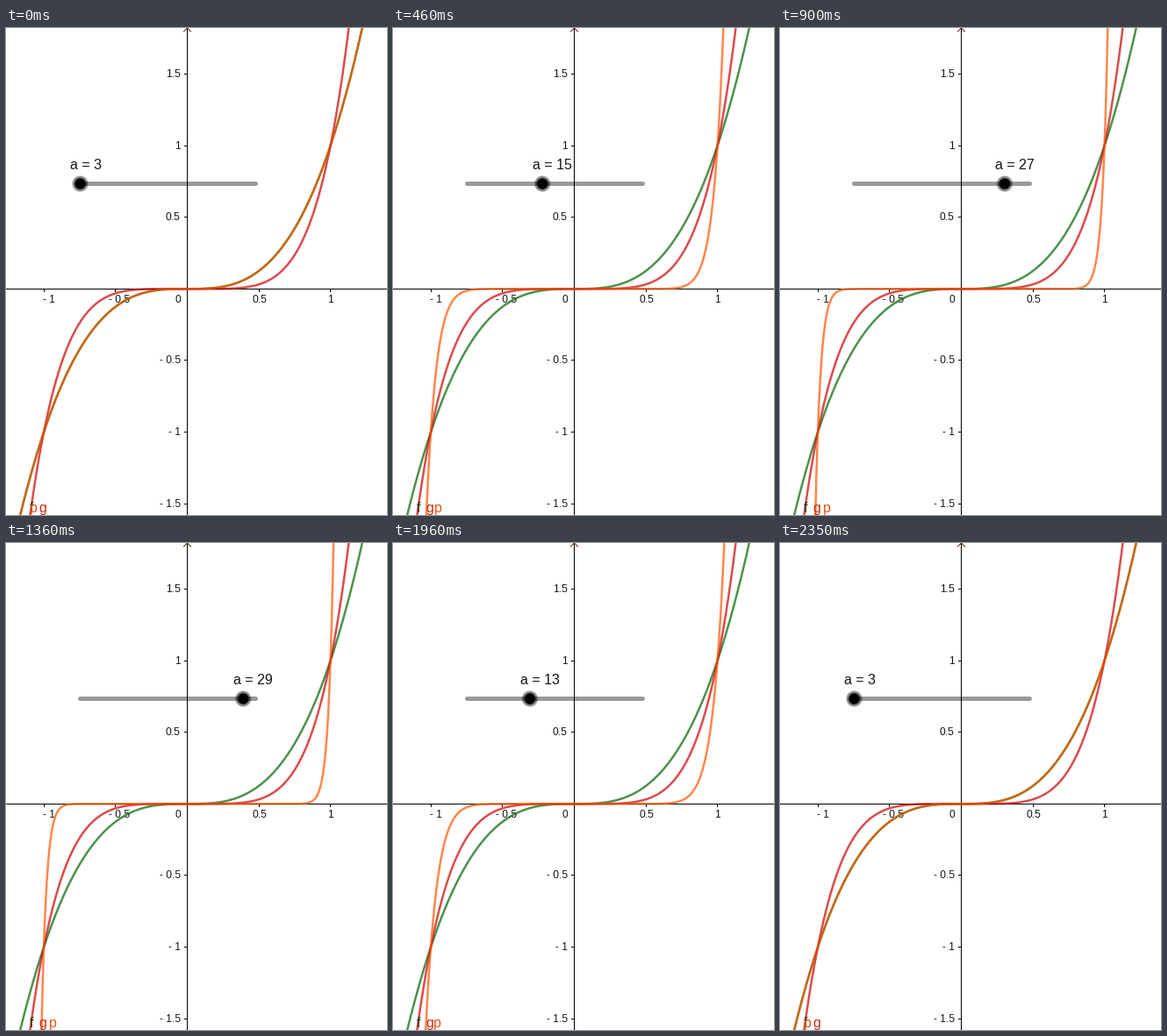
Write a matplotlib script that moves like this. It is 434 px wide and 555 px high and loops after 2.42 s.

```python
import numpy as np
import matplotlib.pyplot as plt
from matplotlib.animation import FuncAnimation
from matplotlib.patches import Circle

W, H, DPI = 434, 555, 100
PX = 72 / DPI                       # points per pixel
X0, Y0, UNIT = 206.35, 297.3, 163.3
LOOP, TICK = 2420, 10

# Times in ms at which the exponent goes up or down by two
UP = np.array([70, 150, 230, 300, 380, 460, 540,
               610, 690, 760, 830, 900, 980, 1060])
DOWN = np.array([1360, 1440, 1510, 1590, 1660, 1740, 1810,
                 1880, 1960, 2040, 2110, 2190, 2270, 2350])

GREEN, RED, ORANGE = "#006400", "#cc0000", "#ff5500"

plt.rcParams["font.family"] = "Liberation Sans"
fig = plt.figure(figsize=(W / DPI, H / DPI), dpi=DPI, facecolor="white")
ax = fig.add_axes([0, 0, 1, 1])
ax.set_xlim(0, W)
ax.set_ylim(H, 0)
ax.axis("off")


def line(xs, ys, width=1, color="black", **kw):
    return ax.plot(xs, ys, lw=width * PX, color=color, snap=False, **kw)[0]


def text(x, y, s, size=12, color="#141414", ha="left", z=6):
    return ax.text(x, y, s, fontsize=size * PX, color=color, ha=ha,
                   va="baseline", zorder=z)


def pixel(v):
    """Centre of the pixel that holds v."""
    return np.floor(v) + 0.5


def power(a):
    """Pixel path of y = x**a, a little beyond the stage."""
    end = 2 ** (1 / a)
    x = np.linspace(-end, end, 500)
    return X0 + UNIT * x, Y0 - UNIT * x ** a


def label_x(a):
    """Label position, right of the curve near the bottom edge."""
    return X0 - UNIT * ((548 - Y0) / UNIT) ** (1 / a) + 8.8


def number(v):
    s = f"{abs(v):g}"
    return "- " + s if v < 0 else s


def draw_axes():
    cx, cy = pixel(X0), pixel(Y0)
    line([0, W], [cy, cy], zorder=1)
    line([cx, cx], [0, H], zorder=1)
    line([cx - 4, cx, cx + 4], [4, 0, 4], color="#5a2010", zorder=1)
    for v in (-1.5, -1, -0.5, 0.5, 1, 1.5):
        y = pixel(Y0 - UNIT * v)
        line([203, 206], [y, y], solid_capstyle="butt", zorder=1)
        text(198.7, y + 3.5, number(v), ha="right", z=1.5)
        if abs(v) < 1.5:
            x = pixel(X0 + UNIT * v)
            line([x, x], [298, 301], solid_capstyle="butt", zorder=1)
            text(x + (5 if v < 0 else 0), 313, number(v), ha="center", z=1.5)
    text(196, 313, "0", ha="center", z=1.5)


draw_axes()
line(*power(3), 2.5, GREEN, alpha=0.7, zorder=2)
line(*power(5), 2.5, RED, alpha=0.7, zorder=3)
curve = line([], [], 2.5, ORANGE, alpha=0.7, zorder=4)

text(label_x(3), 552, "f", 16, "#203818")
text(label_x(5), 552, "g", 16, "#cc2a10")
p_label = text(0, 552, "p", 16, "#e8500f")

line([84.5, 284.5], [177.5, 177.5], 5, alpha=0.4,
     solid_capstyle="round", zorder=5)
knob = [Circle((0, 177.5), r, fc="black", ec="none", alpha=alpha, zorder=7,
               snap=False)
        for r, alpha in ((9, 0.42), (7, 0.4), (6, 1))]
for disc in knob:
    ax.add_patch(disc)
value = text(0, 161, "", 16, z=8)


def update(i):
    t = i * TICK
    a = 3 + 2 * int((t >= UP).sum() - (t >= DOWN).sum())
    curve.set_data(*power(a))
    p_label.set_x(label_x(a))
    x = 84.5 + (a - 3) * 200 / 28
    for disc in knob:
        disc.center = x, 177.5
    value.set_x(x - 11.4)
    value.set_text(f"a = {a}")
    return [curve, p_label, value, *knob]


anim = FuncAnimation(fig, update, frames=LOOP // TICK, interval=TICK,
                     repeat=True, repeat_delay=0)
plt.show()
```
